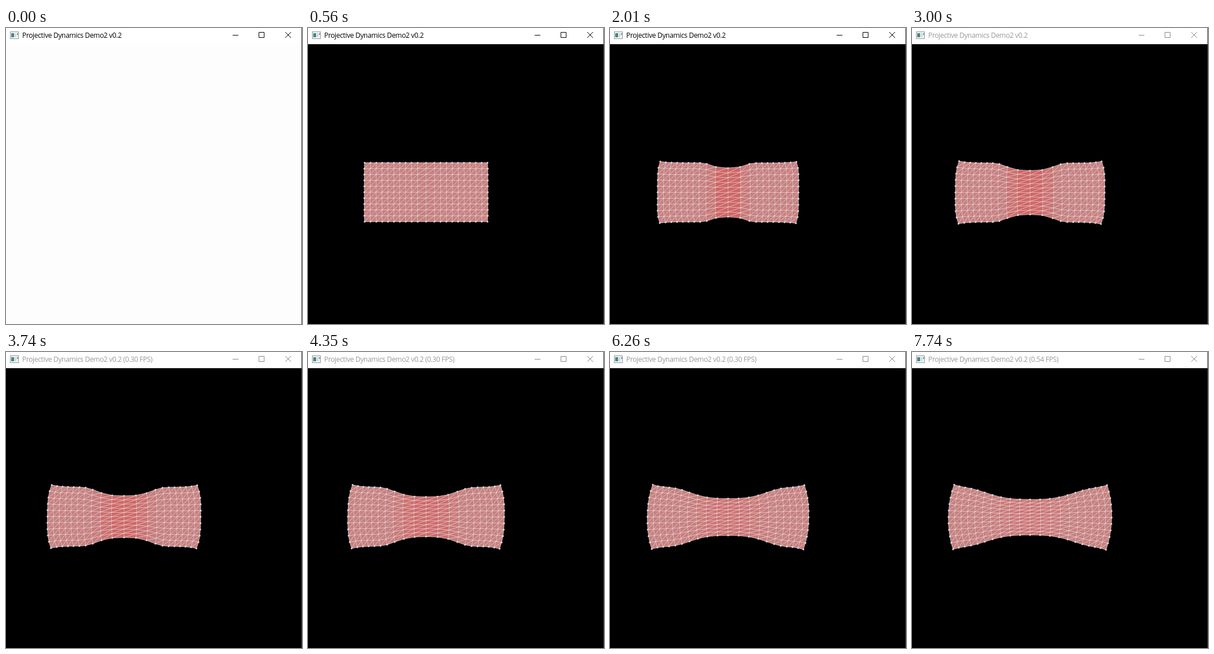
An HTML page with a canvas for the animation above (8 s loop, 512 px wide and 512 px high).

```html
<!DOCTYPE html>
<html lang="en">
<head>
<meta charset="utf-8">
<title>Projective Dynamics</title>
<style>
  html, body { margin: 0; width: 100%; height: 100%; overflow: hidden; background: #fff; }
  canvas { display: block; }
</style>
</head>
<body>
<canvas id="stage" width="512" height="512"></canvas>
<script>
const ctx = document.getElementById('stage').getContext('2d');
const LOOP = 8000, BLUR_TIME = 2260;
const COLS = 20, ROWS = 10, CELL = 10.2, CENTER_X = 204.2, CENTER_Y = 284;

// The simulation is slow: it advances in bursts of five steps.
const BURSTS = [560, 2260, 3980, 5890, 7740], STEP_TIME = 360;

function stepAt(time) {
  const burst = BURSTS.filter(t => t <= time).length - 1;
  return burst < 0 ? -1 : burst * 5 + Math.min(4, Math.floor((time - BURSTS[burst]) / STEP_TIME));
}

const erf = z => Math.tanh(1.128 * z + .1 * z ** 3);

// The stretch starts in the middle columns and spreads outward as it grows.
function sheetAt(step) {
  const grow = 1 - Math.exp(-step / 7.8);
  const spread = .8 + .235 * step;
  const stretch = 4.8 + 37.6 * grow;
  const reach = i => CELL * i + stretch * erf(i / spread);
  const halfHeight = i => 5 * CELL + 5.3 * grow * (i / 10) ** 7
    - 22 * grow * Math.exp(-((i / (.95 * spread)) ** 2.8));

  const cornerPull = .5 + 9 * grow;
  const pullAlong = .6 + .02 * step;
  const pullAcross = 2 + 8 * Math.exp(-step / 5);

  function node(col, row) {
    const offset = col - COLS / 2, i = Math.abs(offset), side = Math.sign(offset);
    const u = i / 10, v = row / ROWS * 2 - 1;
    const inset = cornerPull * u ** pullAlong * Math.abs(v) ** pullAcross;
    return [
      CENTER_X + side * (reach(i) - inset) - grow * v * u ** 3,
      CENTER_Y + .09 * step + v * halfHeight(i) + side * .4 * u * grow
    ];
  }
  return { node, reach };
}

function trace(points) {
  points.forEach(([x, y], i) => i ? ctx.lineTo(x, y) : ctx.moveTo(x, y));
}

function drawMesh(step) {
  const sheet = sheetAt(step);
  const nodes = Array.from({ length: COLS + 1 }, (_, c) =>
    Array.from({ length: ROWS + 1 }, (_, r) => sheet.node(c, r)));

  // Stretched columns turn redder.
  for (let c = 0; c < COLS; c++) {
    const i = Math.abs(c + .5 - COLS / 2) - .5;
    const width = sheet.reach(i + 1) - sheet.reach(i);
    const strain = Math.max(0, Math.min(1, (width - 14.5) / 8));
    const green = 128 - 28 * strain;
    ctx.fillStyle = ctx.strokeStyle = `rgb(${198 + 8 * strain},${green},${green})`;
    ctx.lineWidth = .5;
    ctx.beginPath();
    trace([...nodes[c], ...nodes[c + 1].slice().reverse()]);
    ctx.closePath();
    ctx.fill();
    ctx.stroke();
  }

  ctx.strokeStyle = 'rgba(255,255,255,.68)';
  ctx.lineWidth = .75;
  ctx.beginPath();
  nodes.forEach(trace);
  for (let r = 0; r <= ROWS; r++) trace(nodes.map(column => column[r]));
  for (let c = 0; c < COLS; c++)
    for (let r = 0; r < ROWS; r++) trace([nodes[c][r + 1], nodes[c + 1][r]]);
  ctx.stroke();

  ctx.fillStyle = '#dcdcdc';
  nodes.forEach((column, c) => column.forEach(([x, y], r) => {
    if (c % COLS && r % ROWS) return;
    ctx.beginPath();
    ctx.arc(x, y, 1.5, 0, 7);
    ctx.fill();
  }));
}

function box(color, x, y, w, h) {
  ctx.fillStyle = color;
  ctx.fillRect(x, y, w, h);
}

function drawTitleBar(time) {
  const active = time < BLUR_TIME;
  const fps = time < 3370 ? '' : time < 7000 ? ' (0.30 FPS)' : ' (0.54 FPS)';
  box('#fff', 0, 0, 512, 28);

  box('#9297a0', 7, 6, 15, 13);
  box('#f4f5f7', 8, 7, 13, 11);
  box('#45897f', 9, 9, 5, 7);
  box('#d5d8dc', 15, 9, 3, 7);
  box('#6fa59d', 19, 9, 2, 3);

  ctx.fillStyle = active ? '#000' : '#999';
  ctx.font = '12px "Open Sans", sans-serif';
  ctx.letterSpacing = '-0.34px';
  ctx.fillText('Projective Dynamics Demo2 v0.2' + fps, 28, 17);

  ctx.strokeStyle = active ? '#000' : '#888';
  ctx.lineWidth = 1;
  ctx.beginPath();
  trace([[392, 12.5], [402, 12.5]]);
  trace([[483, 7], [493, 17]]);
  trace([[493, 7], [483, 17]]);
  ctx.rect(437.5, 7.5, 9, 9);
  ctx.stroke();
}

function draw(time) {
  const step = stepAt(time);
  box(step < 0 ? '#fdfdfd' : '#000', 0, 28, 512, 484);
  if (step >= 0) drawMesh(step);
  drawTitleBar(time);
  box('#444', 511, 0, 1, 512);
}

const start = performance.now();
function tick() {
  draw((performance.now() - start) % LOOP);
  requestAnimationFrame(tick);
}
tick();
</script>
</body>
</html>
```
